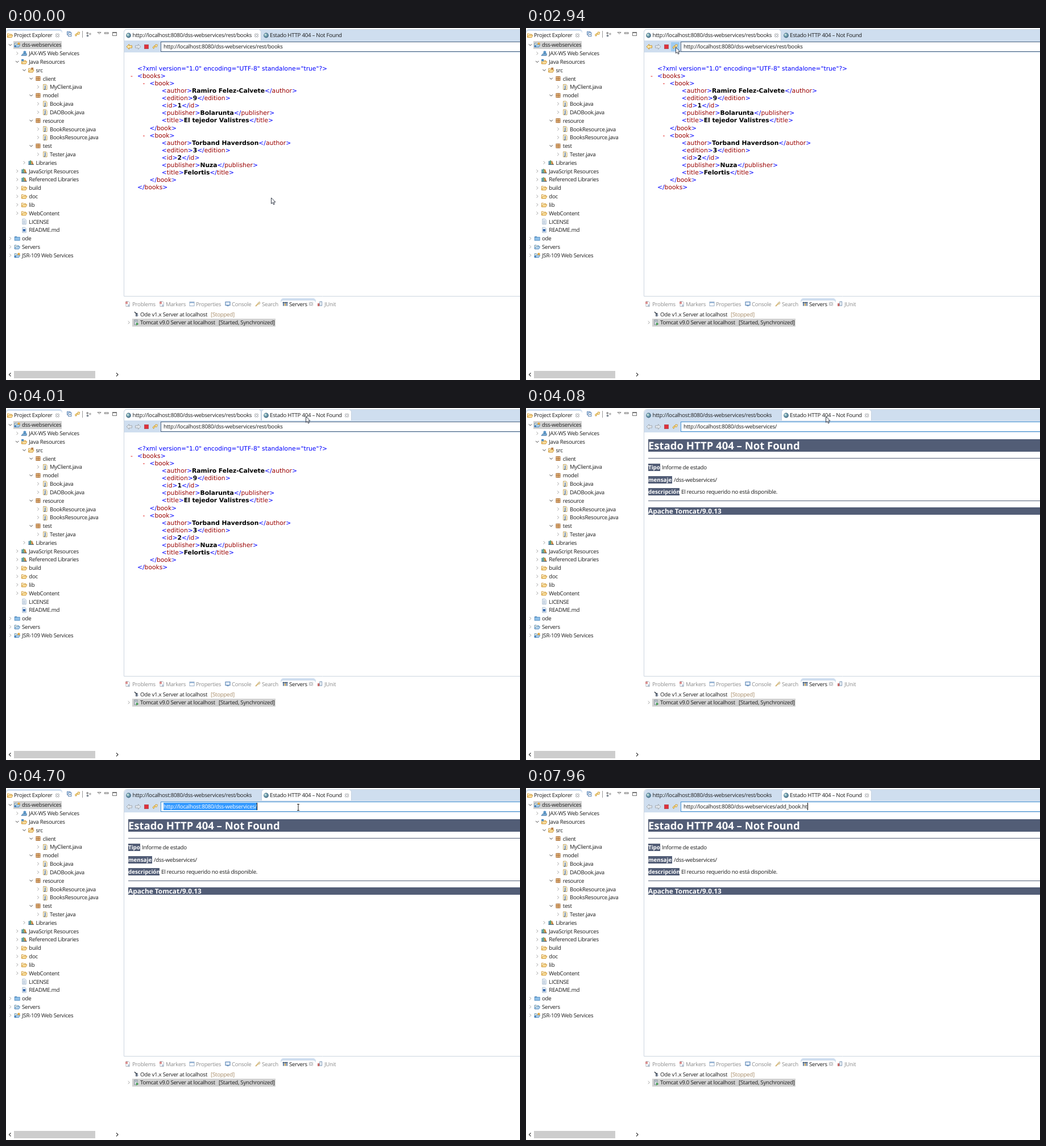
An HTML page with a canvas that plays this animation: 904 by 620 pixels, repeating every 8000 ms.

```html
<!DOCTYPE html>
<html lang="es">
<head>
<meta charset="utf-8">
<style>
html, body { margin: 0; width: 100%; height: 100%; overflow: hidden; background: #fff; }
canvas { display: block; }
</style>
</head>
<body>
<canvas id="stage" width="904" height="620"></canvas>
<script>
const ctx = document.getElementById('stage').getContext('2d');
const LOOP = 8000;
const UI = '9.7px "Open Sans", sans-serif', MONO = '10.72px "DejaVu Sans", sans-serif';
const INK = '#1c1c1c', BAR = '#cfdeef', SLATE = '#525d76', GOLD = '#c8922c', GREY = '#a3a9b0';
const BASE = 'http://localhost:8080/dss-webservices/';

// ---- drawing helpers
function put(s, x, y, color = INK, font = UI, gap = font === UI ? '-0.26px' : '0px') {
  ctx.font = font;
  ctx.letterSpacing = gap;
  ctx.fillStyle = color;
  ctx.fillText(s, x, y);
  return x + ctx.measureText(s).width;
}
function box(x, y, w, h, fill) {
  ctx.fillStyle = fill;
  ctx.fillRect(x, y, w, h);
}
function frame(x, y, w, h, stroke, width = 1) {
  ctx.strokeStyle = stroke;
  ctx.lineWidth = width;
  ctx.strokeRect(x, y, w, h);
}
function path(points, { fill, stroke, width = 1 } = {}) {
  ctx.beginPath();
  points.forEach(([x, y]) => ctx.lineTo(x, y));
  if (fill) { ctx.closePath(); ctx.fillStyle = fill; ctx.fill(); }
  if (stroke) { ctx.strokeStyle = stroke; ctx.lineWidth = width; ctx.stroke(); }
}
function at(x, y, draw) {
  ctx.save();
  ctx.translate(x, y);
  draw();
  ctx.restore();
}
function disc(x, y, r, fill) {
  ctx.fillStyle = fill;
  ctx.beginPath();
  ctx.arc(x, y, r, 0, 7);
  ctx.fill();
}
function tabShape(x, y, w, h, fill, stroke) {
  ctx.beginPath();
  ctx.roundRect(x, y, w, h, [5, 5, 0, 0]);
  ctx.fillStyle = fill;
  ctx.fill();
  if (stroke) { ctx.strokeStyle = stroke; ctx.lineWidth = 1; ctx.stroke(); }
}

// ---- icons, centred on the origin
function folder(edge, fill) {
  path([[-4.5, 3.5], [-4.5, -3], [-1.5, -3], [-0.5, -2], [3, -2], [3, 3.5]], { fill: '#fff6d8', stroke: edge, width: 0.9 });
  path([[-4.5, 3.5], [-2.5, -0.3], [5, -0.3], [3, 3.5]], { fill, stroke: edge, width: 0.9 });
}
function page(edge, fill = '#fbfcff') {
  path([[-3, -4.5], [1.5, -4.5], [3.3, -2.7], [3.3, 4.5], [-3, 4.5]], { fill, stroke: edge, width: 0.8 });
}
const icons = {
  folder: () => folder('#cf9532', '#ffe6a6'),
  blueFolder() { box(-4.5, -3.5, 4, 2, '#4a84b8'); box(-4.5, -2.3, 9, 5.8, '#8fc1ea'); frame(-4.5, -2.3, 9, 5.8, '#4a84b8', 0.8); },
  server: () => folder('#4a84b8', '#c4def4'),
  project() { folder('#4a84b8', '#b9d7ef'); disc(2.8, -2.2, 2.2, '#e0a640'); box(-5, 1, 3, 3, '#3f7db5'); },
  service() { disc(1, -1.8, 2.5, '#5a97ca'); path([[-5, 4], [-2, 0.5], [4.5, 0.5], [4, 4]], { fill: '#7fb1d8', stroke: '#3d6f9e', width: 0.8 }); },
  resources() { folder('#cf9532', '#ffe6a6'); box(-4.8, -4.5, 4, 3.5, '#4a8bc0'); },
  source() { folder('#cf9532', '#ffe6a6'); box(0, -4.5, 4, 3.5, '#b98149'); },
  pack() { box(-3.5, -3.5, 7, 7, '#e8bd88'); frame(-3.5, -3.5, 7, 7, '#a4672f', 0.9); box(-0.4, -4, 0.9, 8, '#a4672f'); box(-4, -0.4, 8, 0.9, '#a4672f'); },
  java() { page('#b08d3c', '#fff8e2'); put('J', -1.3, 3, '#1f4f94', 'bold 8px "Open Sans", sans-serif'); },
  books() { box(-4.5, -3, 2, 6, '#3b7f9e'); box(-2.2, -4, 2, 7, '#4d9c68'); path([[0, -3], [1.8, -3.4], [4.4, 3], [0.3, 3]], { fill: '#c9853d' }); box(-4.8, 2.8, 9.6, 1, '#39587a'); },
  file() { page('#8ba4bd'); for (let i = -2; i < 4; i += 2) box(-1.8, i, 3.6, 0.8, '#7e9dbd'); },
  note() { page('#8ba4bd'); box(-2.2, -1.8, 4.4, 4.4, '#3d6fb0'); },
  globe() {
    const g = ctx.createRadialGradient(-1.5, -1.5, 0.5, 0, 0, 4.6);
    g.addColorStop(0, '#d9ece4'); g.addColorStop(0.5, '#6f9fae'); g.addColorStop(1, '#3c5e7a');
    disc(0, 0, 4.4, g);
  },
  close() {
    for (const [w, c] of [[3, '#8b8f94'], [1.3, '#fff']])
      for (const s of [1, -1]) path([[-2.8, -2.8 * s], [2.8, 2.8 * s]], { stroke: c, width: w });
  },
  refresh() {
    path([[-4, 1], [-1, -2], [0.5, -0.5], [-2.5, 3.5]], { fill: '#f6dc86', stroke: GOLD, width: 0.9 });
    path([[0, -0.5], [1, -4], [4.3, -3.5], [3, 0.5]], { fill: '#fff2bd', stroke: GOLD, width: 0.9 });
  },
  dots() { disc(-2.3, -2, 2, '#9b9b9b'); disc(2.4, -0.5, 1.9, '#b5b5b5'); disc(-2, 2.6, 1.9, '#7d8893'); },
  marker() { page(GREY); box(-4, -4, 4, 4, '#d99090'); box(0, 1, 3.5, 3, '#b7c6d8'); },
  sheet() { box(-4, -3.5, 8, 7, '#fff'); frame(-4, -3.5, 8, 7, '#8fa6c0', 0.9); box(-4, -3.5, 8, 2, '#8fb0d4'); },
  screen() { box(-4, -3.5, 8, 5.8, '#e8f1fb'); frame(-4, -3.5, 8, 5.8, '#6d93bd', 1.3); box(-2, 3, 4, 1, '#6d93bd'); },
  torch() { path([[-4, 4], [1, -1]], { stroke: '#d6b878', width: 2 }); path([[0, -2], [3, -4], [4, -1], [2, 1]], { fill: '#efe0b4', stroke: '#b9a67c', width: 0.7 }); },
  people() { for (const x of [-3, 0, 3]) { disc(x, -2, 1.4, '#34506e'); box(x - 1, -0.5, 2, 4, x ? '#55749a' : '#b38a35'); } },
  test() { box(-4, -1, 3.5, 5, '#c86a6a'); frame(0, -4, 3.5, 7, '#7794b5'); },
  daemon() { box(-1, -2, 3.5, 6, '#5d6672'); path([[-3, -4], [0, -1]], { stroke: '#3a4450', width: 1.6 }); disc(2, 2, 1.6, '#8b9bb0'); },
  running() { box(-3, -4.5, 5, 8.5, '#d7dde3'); frame(-3, -4.5, 5, 8.5, '#707f8e', 0.8); box(-2, -2.5, 3, 0.8, '#707f8e'); path([[0, 0], [4.5, 2.5], [0, 5]], { fill: '#3f9d4b' }); },
  open: () => path([[-2.6, -1.4], [0, 1.3], [2.6, -1.4]], { stroke: '#404040' }),
  closed: () => path([[-1.3, -2.6], [1.3, 0], [-1.3, 2.6]], { stroke: '#a0a0a0' })
};
const icon = (name, x, y) => at(x, y, icons[name]);

// ---- left side: depth, icon, arrow (v open, > closed), label
const tree = [
  '0 project v dss-webservices', '1 service > JAX-WS Web Services', '1 resources v Java Resources',
  '2 source v src', '3 pack v client', '4 java > MyClient.java', '3 pack v model', '4 java > Book.java',
  '4 java > DAOBook.java', '3 pack v resource', '4 java > BookResource.java', '4 java > BooksResource.java',
  '3 pack v test', '4 java > Tester.java', '2 books > Libraries', '1 books > JavaScript Resources',
  '1 books > Referenced Libraries', '1 folder > build', '1 folder > doc', '1 folder > lib',
  '1 folder > WebContent', '1 file - LICENSE', '1 note - README.md', '0 blueFolder > ode',
  '0 server > Servers', '0 project > JSR-109 Web Services'
];
function drawExplorer() {
  tabShape(0, 2, 99, 8, BAR);
  tabShape(0, 5, 99, 17, '#fff');
  icon('folder', 7, 13);
  put('Project Explorer', 14, 16.3);
  icon('close', 90.5, 13);
  box(107, 6, 6, 6, '#dce9f7'); frame(107.5, 6.5, 5.5, 5.5, '#5f87b5');
  box(109, 8, 6, 6, '#fff'); frame(109.5, 8.5, 5.5, 6, '#5f87b5');
  box(111, 11, 3, 1, '#39618f');
  icon('refresh', 125.5, 11);
  box(134, 5, 1, 12, '#9a9a9a');
  icon('dots', 145.5, 11);
  path([[161, 7.5], [167, 7.5], [164, 10.5]], { fill: '#fff', stroke: '#777' });
  frame(173.5, 8, 6.5, 2, '#777');
  frame(187.5, 7.5, 7, 6, '#777'); box(187, 7, 8, 2, '#777');

  box(13, 23, 85, 14, '#d2d2d2');
  tree.forEach((row, i) => {
    const [, depth, name, arrow, label] = row.match(/(\d) (\w+) (\S) (.*)/);
    const x = 28 + depth * 12.25, y = 29.8 + i * 14.82;
    if (arrow !== '-') icon(arrow === 'v' ? 'open' : 'closed', x - 20.5, y);
    icon(name, x - 8.3, y);
    put(label, x, y + 3.5);
  });

  box(14, 604, 143, 13, '#cdcdcd');
  path([[8.5, 607.5], [5.5, 610.5], [8.5, 613.5]], { stroke: '#444', width: 1.3 });
  path([[194, 607.5], [197, 610.5], [194, 613.5]], { stroke: '#444', width: 1.3 });
}

function drawServers() {
  tabShape(483, 476, 62, 8, BAR);
  tabShape(483, 480, 62, 15, '#fff');
  [['marker', 214, 'Problems', 222], ['marker', 274, 'Markers', 281], ['sheet', 327, 'Properties', 334],
   ['screen', 390, 'Console', 397], ['torch', 443, 'Search', 450], ['people', 491, 'Servers', 498], ['test', 552, 'JUnit', 560]]
    .forEach(([name, x, label, tx]) => {
      icon(name, x, 486);
      put(label, tx, 489.7, label === 'Servers' ? INK : '#8d8d8d');
    });
  icon('close', 536.5, 486);
  icon('daemon', 229, 504);
  put('Ode v1.x Server at localhost', 236, 507.5);
  put('[Stopped]', 360, 507.5, '#a58a66');
  box(222, 512, 252, 14, '#d2d2d2');
  icon('closed', 216, 518.7);
  icon('running', 229, 518.7);
  put('Tomcat v9.0 Server at localhost', 236, 522.2);
  put('[Started, Synchronized]', 374, 522.2);
}

// ---- pages
const book = (author, edition, id, publisher, title) => ['1<book>',
  ...Object.entries({ author, edition, id, publisher, title }).map(([k, v]) => `2<${k}>${v}</${k}>`), '1</book>'];
const xml = ['0<books>',
  ...book('Ramiro Felez-Calvete', 9, 1, 'Bolarunta', 'El tejedor Valistres'),
  ...book('Torband Haverdson', 3, 2, 'Nuza', 'Felortis'), '0</books>'];

function drawXml() {
  put('<?xml version="1.0" encoding="UTF-8" standalone="true"?>', 231, 75, '#00f', MONO);
  xml.forEach((line, i) => {
    const y = 88.1 + i * 13.06, level = +line[0];
    let x = 231 + level * 21.4, prev = '';
    if (/^\d<books?>/.test(line)) put('-', x - 12, y, '#e00000', MONO);
    for (const part of line.slice(1).split(/(<\/?|>)/)) {
      if (/[<>]/.test(part)) x = put(part, x, y, '#00f', MONO);
      else if (prev[0] === '<') x = put(part, x, y, '#900', MONO);
      else if (part) x = put(part, x, y, '#000', 'bold ' + MONO);
      prev = part;
    }
  });
}

const bold = size => `bold ${size}px "Open Sans", sans-serif`;
function drawNotFound() {
  box(215, 55, 689, 22, SLATE);
  put('Estado HTTP 404 – Not Found', 215, 73, '#fff', bold(18.5));
  box(215, 88, 689, 1, SLATE);
  [['Tipo', 21, 'Informe de estado'], ['mensaje', 42, '/dss-webservices/'],
   ['descripción', 55, 'El recurso requerido no está disponible.']].forEach(([name, w, value], i) => {
    const y = 108.3 + i * 21.3;
    box(215, Math.round(y - 10), w, 13, SLATE);
    put(name, 215, y, '#fff', bold(9.75));
    put(value, 215 + w + 3, y);
  });
  box(215, 163, 689, 1, SLATE);
  box(215, 175, 689, 13, SLATE);
  put('Apache Tomcat/9.0.13', 215, 186, '#fff', bold(11.85));
}

// ---- pointer: start, end, steps, target x, y
const moves = [
  [710, 1480, 11, 259.5, 40], [1630, 1710, 2, 260, 36], [1790, 2090, 5, 262, 36], [2320, 2400, 2, 262, 35.5],
  [2550, 2930, 6, 263, 34], [3010, 3330, 5, 292, 34], [3400, 4010, 9, 527, 15], [4090, 4160, 2, 528, 16], [4240, 4620, 6, 514, 34]
];
function pointerAt(t) {
  let x = 466, y = 299;
  for (const [start, end, steps, tx, ty] of moves) {
    if (t < start) break;
    const p = Math.min(1, (Math.floor((t - start) / (end - start) * (steps - 1) + 1e-6) + 1) / steps);
    const e = p * p * (3 - 2 * p);
    x += (tx - x) * e;
    y += (ty - y) * e;
  }
  return { x, y };
}
function drawPointer({ x, y }) {
  const overField = x > 273 && y > 24 && y < 43;
  at(x, y, () => {
    if (overField) {
      path([[0, -5.5], [0, 5.5]], { stroke: '#222' });
      for (const end of [-5.5, 5.5]) path([[-2, end], [2, end]], { stroke: '#222' });
    } else {
      path([[0.5, 0], [0.5, 10.5], [2.9, 8.4], [4.5, 12], [6.2, 11.3], [4.7, 7.8], [7.9, 7.6]],
        { fill: '#fff', stroke: '#222a38', width: 0.9 });
    }
  });
}

// ---- browser
const typed = 'add_book.ht';
const keys = [5630, 5710, 5940, 6320, 6640, 6720, 6950, 6950, 7250, 7800, 7960];

function drawArrow(x, dir, fill, edge) {
  path([[-5, 0], [-0.5, -4.3], [-0.5, -2], [4.5, -2], [4.5, 2], [-0.5, 2], [-0.5, 4.3]].map(([a, b]) => [x + a * dir, 33 + b]),
    { fill, stroke: edge });
}
function drawUrl(t, second) {
  const focused = t >= 4620, selected = focused && t < 5310;
  box(272, 24, 632, 18, '#fff');
  frame(272.5, 24.5, 640, 17, second ? '#3f8fd0' : '#46607f');
  if (selected) box(277, 26, 165, 13, '#3399ff');
  const count = keys.filter(k => t >= k).length;
  const end = put(second ? BASE + typed.slice(0, count) : BASE + 'rest/books', 277, 36.3, selected ? '#fff' : INK);
  const caret = focused && !(t >= 5080 && t < 5310) && !(t >= 7730 && t < 7800);
  if (caret) box(Math.round(end), 26, 1, 13, '#000');
}
function drawBrowser(t, pointer) {
  const clicked = t >= 4010, second = t >= 4080;
  const overTab = pointer.x > 449 && pointer.x < 608 && pointer.y < 22;
  tabShape(207.5, 2.5, 710, 470, '#fff', '#cdd6e0');
  tabShape(208, 3, 710, 40, BAR);
  if (!second) tabShape(207.5, 2.5, 241, 20, '#fff', '#c3d0df');
  if (clicked) tabShape(449.5, 2.5, 158, 20, '#fff', '#c3d0df');
  box(208, 22, 696, 21, BAR);
  icon('globe', 215.5, 13);
  put(BASE + 'rest/books', 222.5, 16.4);
  if (!second) icon('close', 440.5, 13);
  icon('globe', 457.5, 13);
  put('Estado HTTP 404 – Not Found', 464, 16.4);
  if (clicked || overTab) icon('close', 599.5, 13);

  drawArrow(217, 1, clicked ? '#e3e8ee' : '#ffe9a8', clicked ? GREY : GOLD);
  drawArrow(232, -1, '#e3e8ee', GREY);
  box(243, 29, 8, 8, '#e0303a');
  frame(243.5, 29.5, 7, 7, '#b8505a');
  if (t >= 2320 && pointer.x < 271) box(255, 25, 15, 16, '#9fcbf0');
  icon('refresh', 262, 33);
  drawUrl(t, second);
  if (second) drawNotFound(); else drawXml();
}
function drawClick(t, { x, y }) {
  if (t >= 1630 && t < 1870) disc(x + 0.5, y - 0.5, 7.5, 'rgba(246,238,50,.85)');
}

function render() {
  const t = performance.now() % LOOP;
  const pointer = pointerAt(t);
  ctx.textRendering = 'geometricPrecision';
  box(0, 0, 904, 620, '#fff');
  drawExplorer();
  drawBrowser(t, pointer);
  drawServers();
  drawClick(t, pointer);
  if (t < 5630) drawPointer(pointer);
  requestAnimationFrame(render);
}
render();
</script>
</body>
</html>
```
